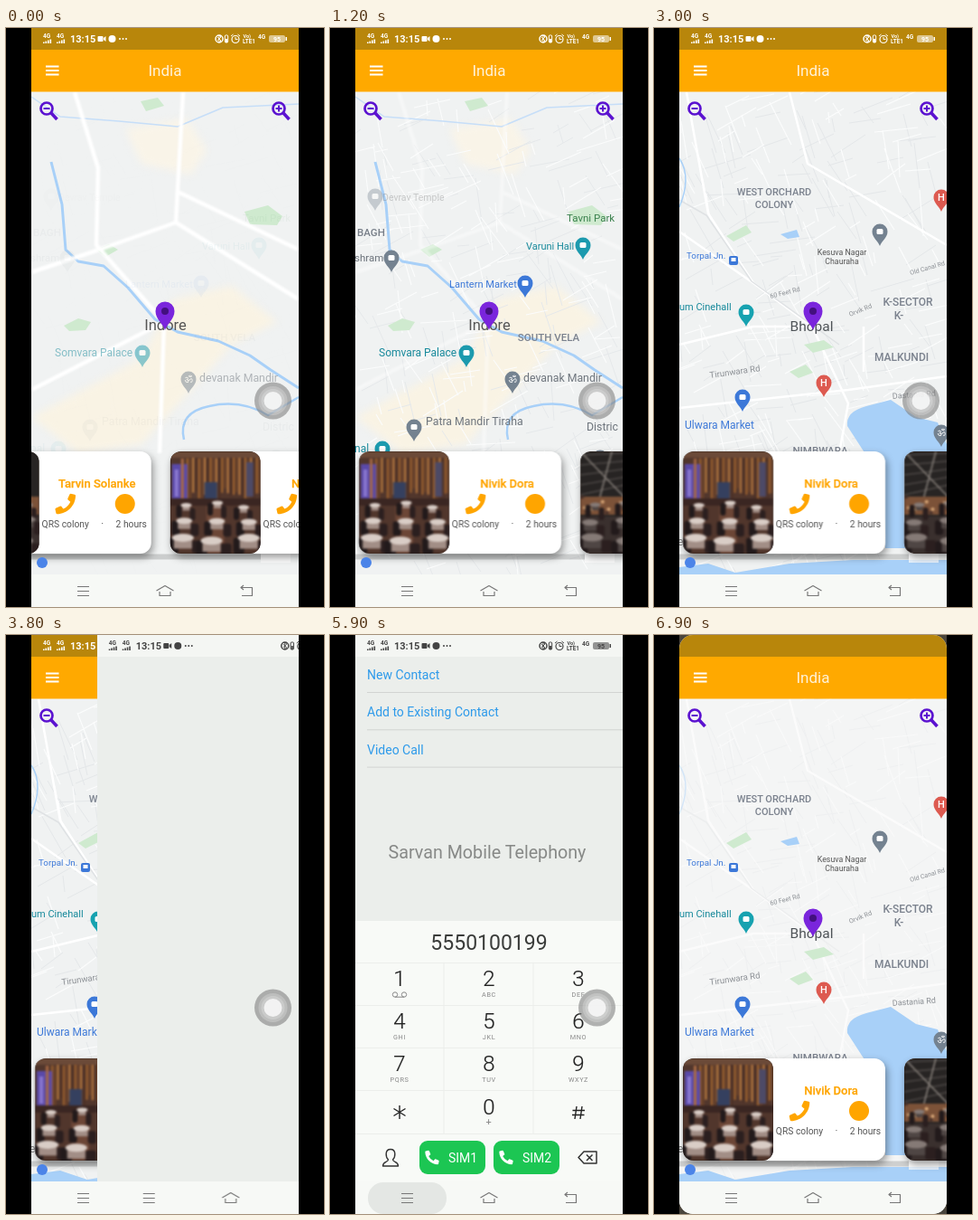
Animation, 352 px wide and 640 px high, one loop 7 s. Source, as an HTML page:

```html
<!DOCTYPE html>
<html lang="en">
<head>
<meta charset="utf-8">
<title>Map cards and dialer</title>
<style>
html, body { margin: 0; width: 100%; height: 100%; overflow: hidden; background: #000; }
#phone { position: absolute; left: 28px; top: 0; width: 296px; height: 640px; overflow: hidden; background: #4a453c; }
svg { position: absolute; inset: 0; width: 296px; height: 640px; overflow: hidden; font-family: Roboto, Arial, sans-serif; }
#app, #dialer, #ball, #app g, #dialer g { animation: 7s linear infinite both; }
.mid { text-anchor: middle; }
.area { font-weight: 500; fill: #7b828e; }

#app { animation-name: app; }
#dialer { animation-name: dialer; }
#ball { animation-name: ball; }
#app .scroll { animation-name: scroll; }
#app .first { animation-name: first; }
#app .second { animation-name: second; }
#app .near { animation-name: near; }
#app .far { animation-name: far; }
#app .avenues { animation-name: avenues; }
#app .coarse { animation-name: coarse; }
#app .detail { animation-name: detail; }
#app .icons { animation-name: icons; }
#app .veil { animation-name: veil; }
#dialer .content { animation-name: content; }
#dialer .press { animation-name: press; }

@keyframes scroll {
  0% { transform: translateX(150px); animation-timing-function: cubic-bezier(.3, .4, .7, .85); }
  8.571% { transform: translateX(37px); animation-timing-function: ease-out; }
  17.143%, 100% { transform: none; }
}
@keyframes near { 0% { opacity: .5; } 7.143%, 100% { opacity: 1; } }
@keyframes far { 0% { opacity: .05; } 8%, 100% { opacity: 1; } }
@keyframes avenues { 0% { opacity: 1; } 8%, 100% { opacity: .4; } }
@keyframes first {
  0%, 18.571% { transform: none; animation-timing-function: ease-in; }
  24.286%, 100% { transform: translate(-700px, 1300px); }
}
@keyframes second {
  0%, 20% { transform: translate(1000px, -1860px); animation-timing-function: cubic-bezier(.3, .4, .5, 1); }
  25.714% { transform: translate(117px, -218px); animation-timing-function: ease-out; }
  31.43%, 100% { transform: none; }
}
@keyframes coarse { 0%, 27% { opacity: 1; } 32.857%, 100% { opacity: 0; } }
@keyframes detail { 0%, 28.571% { opacity: 0; } 40%, 100% { opacity: 1; } }
@keyframes icons { 0%, 87.143% { opacity: 1; } 87.2%, 100% { opacity: 0; } }
@keyframes veil { 0%, 87.143% { opacity: 0; } 87.2%, 100% { opacity: .55; } }
@keyframes app {
  0%, 87.1% { transform: none; border-radius: 0; }
  87.143%, 90% { transform: translateX(-215px) scale(.62); border-radius: 24px; animation-timing-function: ease-out; }
  93.5%, 94.286% { transform: scale(.62); border-radius: 24px; animation-timing-function: ease-out; }
  98.571%, 100% { transform: none; border-radius: 15px; }
}
@keyframes dialer {
  0%, 52.857% { transform: translateX(296px); animation-timing-function: cubic-bezier(.2, .6, .3, 1); }
  57.143%, 87.143% { transform: none; border-radius: 0; animation-timing-function: ease-out; }
  90% { transform: scale(.62); border-radius: 24px; animation-timing-function: ease-out; }
  93.5%, 94.286% { transform: translateX(215px) scale(.62); border-radius: 24px; animation-timing-function: ease-out; }
  98%, 100% { transform: translateX(330px) scale(.8); border-radius: 24px; }
}
@keyframes content { 0%, 71.3% { opacity: 0; } 74.3%, 100% { opacity: 1; } }
@keyframes press { 0%, 82.8% { opacity: 0; } 84.286%, 100% { opacity: 1; } }
@keyframes ball { 0%, 89.9% { opacity: 1; } 92%, 100% { opacity: 0; } }
</style>
</head>
<body>
<div id="phone">
  <svg id="app" viewBox="28 0 296 640"></svg>
  <svg id="dialer" viewBox="28 0 296 640"></svg>
  <svg id="ball" viewBox="28 0 296 640">
    <circle cx="295.5" cy="412" r="20.5" fill="#808080" opacity=".6"/>
    <circle cx="295.5" cy="412" r="16" fill="#fff" opacity=".22"/>
    <circle cx="295.5" cy="412" r="13" fill="#fff" opacity=".2"/>
    <circle cx="295.5" cy="412" r="10" fill="#fff" opacity=".75"/>
  </svg>
</div>
<script>
let seed = 11;
const rnd = (a, b) => {
  seed = seed * 16807 % 2147483647;
  return a + (b - a) * seed / 2147483647;
};
const rect = (x, y, w, h, fill, extra = '') =>
  `<rect x="${x}" y="${y}" width="${w}" height="${h}" fill="${fill}" ${extra}/>`;
const dot = (x, y, r, fill) => `<circle cx="${x}" cy="${y}" r="${r}" fill="${fill}"/>`;
const oval = (x, y, rx, ry, fill) => `<ellipse cx="${x}" cy="${y}" rx="${rx}" ry="${ry}" fill="${fill}"/>`;
const line = (d, color, width, extra = '') =>
  `<path d="${d}" fill="none" stroke="${color}" stroke-width="${width}" stroke-linejoin="round" ${extra}/>`;
const shape = (d, fill) => `<path d="${d}" fill="${fill}"/>`;
const text = (s, x, y, size, fill, extra = '') =>
  `<text x="${x}" y="${y}" font-size="${size}" fill="${fill}" ${extra}>${s}</text>`;
const mid = (s, x, y, size, fill, extra = '') => text(s, x, y, size, fill, `class="mid" ${extra}`);
const area = (s, x, y, size) => `<text class="mid area" x="${x}" y="${y}" font-size="${size}">${s}</text>`;
const slanted = (s, x, y, size, angle) => text(s, x, y, size, '#8b8f94', `transform="rotate(${angle} ${x} ${y})"`);
const group = (name, body) => `<g class="${name}">${body}</g>`;
const blurred = (body, radius) => `<g style="filter:blur(${radius}px)">${body}</g>`;

const BLUE = '#3c78d8', TEAL = '#17899b', SLATE = '#748290', RED = '#dd5a50', ORANGE = '#ffa500';
const GREEN = '#cfeacf', WATER = '#a8d0f8', LAND = '#f0f2f2', PURPLE = '#5b12d0';

const place = (x, y, color, glyph = '') =>
  shape(`M${x} ${y + 15}C${x - 2} ${y + 9} ${x - 8.5} ${y + 6} ${x - 8.5} ${y - 1}a8.5 8.5 0 0 1 17 0C${x + 8.5} ${y + 6} ${x + 2} ${y + 9} ${x} ${y + 15}z`, color) +
  (glyph ? mid(glyph, x, y + 3, 11, '#fff', 'font-weight="500"') : rect(x - 3.5, y - 4, 7, 6, '#fff', 'rx="1.5"'));

const marker = shape('M176 334C174 327 165.500 322 165.500 313a10.500 10.500 0 0 1 21 0C186.500 322 178 327 176 334z', '#7a25dc') +
  dot(176, 313, 4, '#43107f');

function streets(count, tilt, width, color) {
  let d = '';
  for (let i = 0; i < count; i++) {
    const angle = tilt + (i % 2) * Math.PI / 2 + rnd(-.3, .3), len = rnd(12, 55);
    d += `M${rnd(20, 310).toFixed()} ${rnd(70, 600).toFixed()}l${(len * Math.cos(angle)).toFixed()} ${(len * Math.sin(angle)).toFixed()}`;
  }
  return line(d, color, width);
}

function firstCity() {
  const land = rect(28, 71, 296, 533, LAND) +
    blurred(shape('M28 430L100 392 150 365 185 300 250 285 300 325 250 350 205 400 150 460 80 470z', '#f9f3e4') +
      shape('M132 112L200 100 222 135 205 162 150 150z', '#f9f4e8'), 4);
  const ways = streets(170, -.35, 1, '#e5e8ea') + streets(190, -.35, 1.1, '#fbfcfc');
  const roads = line('M76 71L102 155 100 240 175 325M196 71L188 215 100 246M188 180L324 245M188 215L324 300M28 400L175 325M28 270L100 246M175 325L170 470', '#fff', 4.5);
  const rivers = line('M50 148L62 195 66 245 80 258 108 263 135 287 165 322 190 336 235 346 270 362 293 378 324 398', WATER, 3) +
    line('M197 455Q190 425 225 418Q260 410 290 428L324 408', WATER, 2.5) +
    line('M28 76L60 98 125 103 190 109 240 88 324 84', '#c6def8', 1.5);
  const parks = shape('M264 203L290 196 306 208 300 218 270 217z', GREEN) + shape('M64 329L80 321 94 325 88 334 70 335z', GREEN) +
    shape('M100 245L114 239 124 245 110 253z', GREEN) + shape('M149 81L168 77 175 86 155 92z', GREEN);
  const near = text('Somvara Palace', 54, 362.5, 12, TEAL) + place(151, 360, '#1c9aae') +
    text('devanak Mandir', 214, 391, 12.3, '#6d747c') + place(202, 389, SLATE, 'ॐ');
  const far = `<g opacity=".35">${text('Devrav Temple', 58, 191, 10.5, '#777') + place(50, 187, SLATE)}</g>` +
    text('BAGH', 30, 230, 11.5, '#777e88', 'font-weight="500"') + text('shram', 27, 258, 11.5, '#6d747c') + place(68, 255, SLATE) +
    text('Tavni Park', 262, 214, 11.5, '#39804c') +
    text('Varuni Hall', 217, 245, 11, TEAL) + place(280, 241, '#1c9aae') +
    text('Lantern Market', 132, 286.500, 11.1, BLUE) + place(216, 283, BLUE) +
    area('SOUTH VELA', 242, 346, 11.5) +
    text('Patra Mandir Tiraha', 106, 439, 12.3, '#6d747c') + place(93, 442, SLATE) +
    text('nal', 27, 469, 12, TEAL) + place(58, 466, '#1c9aae') +
    text('Distric', 284, 445, 12.3, '#6d747c') + place(299, 476, SLATE);
  return group('first', land + group('far', ways) + parks + blurred(rivers, .5) + group('avenues', blurred(roads, .8)) +
    mid('Indore', 176.5, 334, 16.5, '#555') + group('near', near) + group('far', far) + marker);
}

function secondCity() {
  const yellow = (d, w, c = '#fad776') => line(d, c, w);
  const rough = `<g transform="translate(-117 218)" style="filter:blur(1.3px)">` +
    yellow('M192 125L197 218', 12, '#fbe8b9') + yellow('M-250 248L28 179 178 140 194 118 256 70 420 -40', 18) +
    yellow('M197 213L165 262 135 290 95 366 45 475 -30 620M95 366L150 475 210 600', 6) +
    yellow('M-60 290L28 320 68 333', 8, '#fae4ab') + yellow('M255 549L290 541', 9) +
    line('M135 300L105 360', '#fff', 9) +
    shape('M205 211L229 190 232 201z', WATER) + shape('M252 173L265 163 260 183z', WATER) + '</g>';
  const land = rect(28, 71, 296, 533, LAND) + streets(190, -.35, 1, '#e4e7e9') + streets(200, -.35, 1.1, '#fcfdfd');
  const roads = blurred(line('M36 71L60 205 110 282 175 330 215 415 205 470M28 225L110 282M28 350L110 330 175 330M150 71L170 150 324 240M28 420L215 400 324 385M232 330L232 380', '#fff', 2.5) +
    line('M28 190L58 207 108 280 205 350', '#dfe2e4', 1.5) + line('M28 144Q42 165 28 198', WATER, 1.5), .5);
  const water = shape('M214 440Q212 424 235 418L262 411 290 430 314 436 324 460V575H256Q258 515 236 474z', WATER) +
    shape('M28 604V596L60 592 90 602 150 592 220 588H324V604z', WATER) +
    shape('M140 228L158 223 161 231 148 233z', WATER);
  const parks = shape('M80 230L102 218 108 226 88 236z', GREEN) + shape('M166 350L188 345 199 353 176 359z', GREEN) + shape('M150 380L168 372 176 381 160 387z', GREEN);
  const labels = area('WEST ORCHARD', 133, 185, 11) + area('COLONY', 133, 199, 11) +
    mid('Kesuva Nagar', 208, 251, 8.8, '#555') + mid('Chauraha', 208, 261, 8.8, '#555') +
    place(250, 226, SLATE) + place(318, 188, RED, 'H') + place(188, 393, RED, 'H') + place(318, 448, SLATE, 'ॐ') +
    text('Torpal Jn.', 36, 255, 9.8, BLUE) + rect(83, 252, 10, 10, BLUE, 'rx="2"') + rect(85.5, 254, 5, 4, '#fff') +
    text('um Cinehall', 28, 311.5, 11, TEAL) + place(102, 315, '#17a2b0') +
    slanted('60 Feet Rd', 129, 299, 7.2, -14) + slanted('Orvik Rd', 217, 319, 7.2, -22) + slanted('Old Canal Rd', 284, 273, 7, -16) +
    area('K-SECTOR', 281, 307, 12) + area('K-', 271, 322, 12) + area('MALKUNDI', 274, 368, 12) +
    slanted('Tirunwara Rd', 62, 387, 9.6, -8) + slanted('Dastania Rd', 264, 410, 9, -4) +
    text('Ulwara Market', 34, 443, 12, BLUE) + place(98, 409, BLUE) +
    area('NIMBWARA', 184, 471, 11.5) + text('e', 26, 572, 12, '#777') + mid('Bhopal', 174.5, 335, 15.5, '#4e5357');
  const haze = group('veil', rect(28, 71, 296, 533, '#f7f8f8'));
  return group('second', group('coarse', rough) + group('detail', land + roads + haze + parks + water + labels) + marker);
}

// A dining room: striped wall and violet window, or dark rafters, above laid tables.
function room(x, warm) {
  let s = rect(x, 468, 100, 113, warm ? '#51362c' : '#272423');
  if (warm) {
    for (let i = 0; i < 26; i++)
      s += rect(x + 18 + i * 3.2, 470 + rnd(0, 6), 2.2, rnd(38, 50), ['#a0642f', '#6b432b', '#b87a40', '#4c3026'][i % 4]);
    s += rect(x, 468, 100, 7, '#6b4a38') + rect(x + 2, 482, 17, 40, '#5a49a8') + rect(x + 5, 488, 4, 30, '#8a78d0') +
      rect(x + 12, 476, 3, 46, '#a86a44') + rect(x + 38, 502, 14, 18, '#35405f') + rect(x + 84, 480, 8, 38, '#4d4a66') +
      rect(x, 520, 100, 8, '#3a2622') + rect(x + 40, 528, 20, 53, '#6c4636');
  } else {
    s += line([0, 1, 2, 3, 4].map(i => `M${x} ${472 + i * 11}L${x + 90} ${468 + i * 7}`).join(''), '#4b4644', 1.5) +
      line(`M${x} 468L${x + 55} 525M${x + 35} 468L${x + 20} 525`, '#8a837d', 1.5) +
      rect(x, 518, 100, 20, '#7c5238') + rect(x, 540, 100, 41, '#3a302e');
    for (let i = 0; i < 14; i++) s += dot(x + rnd(2, 95), rnd(518, 540), 2, i % 2 ? '#d9a878' : '#46302a');
  }
  for (let i = 0; i < 9; i++) {
    const row = Math.floor(i / 3), tx = x + 14 + (i % 3) * 35 + rnd(-4, 4), ty = 527 + row * 19 + rnd(-3, 3), size = 6 + row * 3;
    s += rect(tx - size - 5, ty, size, 14 + row * 2, '#221a1b', 'rx="3"') + rect(tx + size - 2, ty + 3, size, 14, '#2b1f1f', 'rx="3"') +
      rect(tx - size + 2, ty, size * 2 - 4, size, warm ? '#a28e86' : '#4f4644') +
      oval(tx, ty, size, 2.5 + row, warm ? '#d9cdc6' : '#857a76');
  }
  return blurred(s, .9);
}

const handset = (x, y, scale, fill) =>
  `<path transform="translate(${x} ${y}) scale(${scale}) translate(-12 -12)" fill="${fill}" d="M23 1L18.300 0Q17.400 0 17 .7L14.700 6Q14.500 6.700 15 7.200L17.900 9.500Q15.400 15 9.500 17.900L7.200 15Q6.700 14.500 6 14.700L.7 17Q0 17.400 0 18.300L1 23Q1.300 24 2.200 24C14 24 24 14 24 2.200Q24 1.300 23 1z"/>`;

function card(x, name, warm) {
  return rect(x, 468, 224, 113, '#fff', 'rx="12" style="filter:drop-shadow(2px 4px 4px #0006)"') +
    `<clipPath id="c${x + 300}">${rect(x, 468, 100, 113, '#000', 'rx="12"')}</clipPath>` +
    `<g clip-path="url(#c${x + 300})">${rect(x, 468, 100, 113, '#33261f') + room(x, warm)}</g>` +
    mid(name, x + 164, 507.5, 13, ORANGE, `font-weight="500" stroke="${ORANGE}" stroke-width=".25"`) +
    handset(x + 129, 526, .94, ORANGE) + dot(x + 195, 526, 11, ORANGE) +
    mid('QRS colony', x + 129, 552, 10.3, '#555') + mid('·', x + 170, 552, 11, '#555') + mid('2 hours', x + 202, 552, 10.3, '#555');
}

function statusIcons(c) {
  const bold = 'font-weight="700"';
  const signal = x => text('4G', x, 11, 6.5, c, bold) + [0, 1, 2, 3].map(i => rect(x + i * 2.5, 15.5 - i, 1.6, 1.5 + i, c)).join('');
  return signal(41) + signal(56) + text('13:15', 71, 16, 11, c, bold) +
    rect(101.5, 9, 6, 6, c, 'rx="1"') + shape('M108 11L110.500 9V15L108 13z', c) + dot(117.5, 12, 4, c) +
    [126, 129.5, 133].map(x => dot(x, 12, 1, c)).join('') +
    `<circle cx="236" cy="12" r="4" fill="none" stroke="${c}" stroke-width="1.500"/>` + line('M234 10L238 14 236 16V8L238 10 234 14', c, .9) +
    rect(242.3, 8, 3.4, 8, 'none', `stroke="${c}" rx="1"`) + rect(243, 12, 2, 4, c) +
    `<circle cx="254" cy="12.500" r="4" fill="none" stroke="${c}" stroke-width="1.200"/>` + line('M254 10V12.500H256.500M249 9L251.500 7M259 9L256.500 7', c, 1) +
    text('Vo)', 262.5, 10.5, 5.5, c, bold) + text('LTE1', 262, 17, 6.3, c, bold) + text('4G', 279, 12, 6.5, c, bold) +
    rect(291, 8, 18, 8, c, 'rx="2" opacity=".55"') + rect(309.5, 10, 1.5, 4, c) + mid('95', 300, 14.5, 7, c, bold);
}

const navBar = (press = '') => rect(28, 604, 296, 36, '#f7f9f6') + press +
  line('M79 617.500H92M79 622.500H92M79 627.500H92', '#777', 1.2) +
  line('M166.500 622L176 616.500 185.500 622M170 623V627.500H182V623', '#777', 1.2) +
  line('M263 616L260 618.500 263 621M260 618.500H272.500V627.500H261', '#777', 1.2);

const lens = (x, sign) => `<circle cx="${x}" cy="89" r="6.500" fill="none" stroke="${PURPLE}" stroke-width="2.700"/>` +
  line(`M${x + 5} 94L${x + 11.5} 101`, PURPLE, 3.6) + line(sign, PURPLE, 2);

const cards = group('scroll', card(-213, 'Tarvin Solanke', false) + card(32, 'Nivik Dora', true) + card(277, 'Osmit Vale', false));

document.getElementById('app').innerHTML =
  rect(28, 0, 296, 640, '#f4f5f3') + firstCity() + secondCity() +
  rect(282, 527, 33, 64, '#fff', 'opacity=".7"') + line('M292 542H305M298.500 535.500V548.500M292 574H305', '#666', 2) +
  rect(28, 581.5, 254, 6, '#777', 'opacity=".3"') + cards + dot(40, 591, 6, '#4b84e8') +
  rect(28, 0, 296, 24, '#b8860b') + rect(28, 24, 296, 46.5, '#ffa900') +
  group('icons', statusIcons('#fff')) +
  line('M44 42.500H58.500M44 47H58.500M44 51.500H58.500', '#fff', 1.8) + mid('India', 176, 53, 17, '#fff3da') +
  lens(45, 'M41.500 89H48.500') + lens(302, 'M298.500 89H305.500M302 85.500V92.500') + navBar();

function keypad() {
  const letters = ['', 'ABC', 'DEF', 'GHI', 'JKL', 'MNO', 'PQRS', 'TUV', 'WXYZ', '', '+', ''];
  return [...'123456789*0#'].map((key, i) => {
    const x = 77 + i % 3 * 99, y = 388 + Math.floor(i / 3) * 47.2;
    if (key === '*') return line('M77 520V535M70.500 523.500L83.500 531.500M83.500 523.500L70.500 531.500', '#222', 1.4);
    if (key === '#') return line('M273 521L271 535M279 521L277 535M268.500 525.500H282M268 530.500H281.500', '#222', 1.4);
    return mid(key, x, y, 24, '#222', 'font-weight="300" stroke="#222" stroke-width=".2"') +
      mid(letters[i], x, y + 12, key === '0' ? 11 : 7.3, '#888', 'letter-spacing=".6"');
  }).join('') + `<g fill="none" stroke="#888"><circle cx="72" cy="397.500" r="2.700"/><circle cx="82" cy="397.500" r="2.700"/><path d="M72 400.200H82"/></g>`;
}

const simButton = (x, label) => rect(x, 559, 73, 37, '#1cc653', 'rx="9"') +
  `<g transform="translate(${x + 14} 577.500) scale(-1 1)">${handset(0, 0, .64, '#fff')}</g>` + text(label, x + 32, 583, 14, '#fff');

const menu = ['New Contact', 'Add to Existing Contact', 'Video Call'].map((item, i) =>
  text(item, 41, 49 + i * 41.3, 14, '#2d9aea') + rect(41, 63 + i * 41.3, 283, 1, '#d2d4d2')).join('');

document.getElementById('dialer').innerHTML =
  rect(28, 0, 296, 640, '#ebeeeb') + rect(28, 0, 296, 24, '#f4f6f3') + statusIcons('#444') +
  group('content', menu + mid('Sarvan Mobile Telephony', 174, 247, 19.7, '#878987') +
    rect(28, 316, 296, 288, '#f8faf7') + mid('5550100199', 176, 348, 23, '#3a3c3a') +
    line('M28 362.500H324M28 409.500H324M28 456.500H324M28 503.500H324M28 551.500H324M126 362V551M225 362V551', '#eceeeb', 1) +
    keypad() + simButton(99, 'SIM1') + simButton(181, 'SIM2') +
    line('M67 568.500C60.500 568.500 61.500 577 64.500 580C64 583 58.500 582 58.500 587H75.500C75.500 582 70 583 69.500 580C72.500 577 73.500 568.500 67 568.500z', '#333', 1.4) +
    line('M275 577.500L281 571H295V584H281zM284 574.500L290.500 581M290.500 574.500L284 581', '#333', 1.5)) +
  navBar(group('press', rect(42, 605, 87, 35, '#e4e7e4', 'rx="17"')));
</script>
</body>
</html>
```
